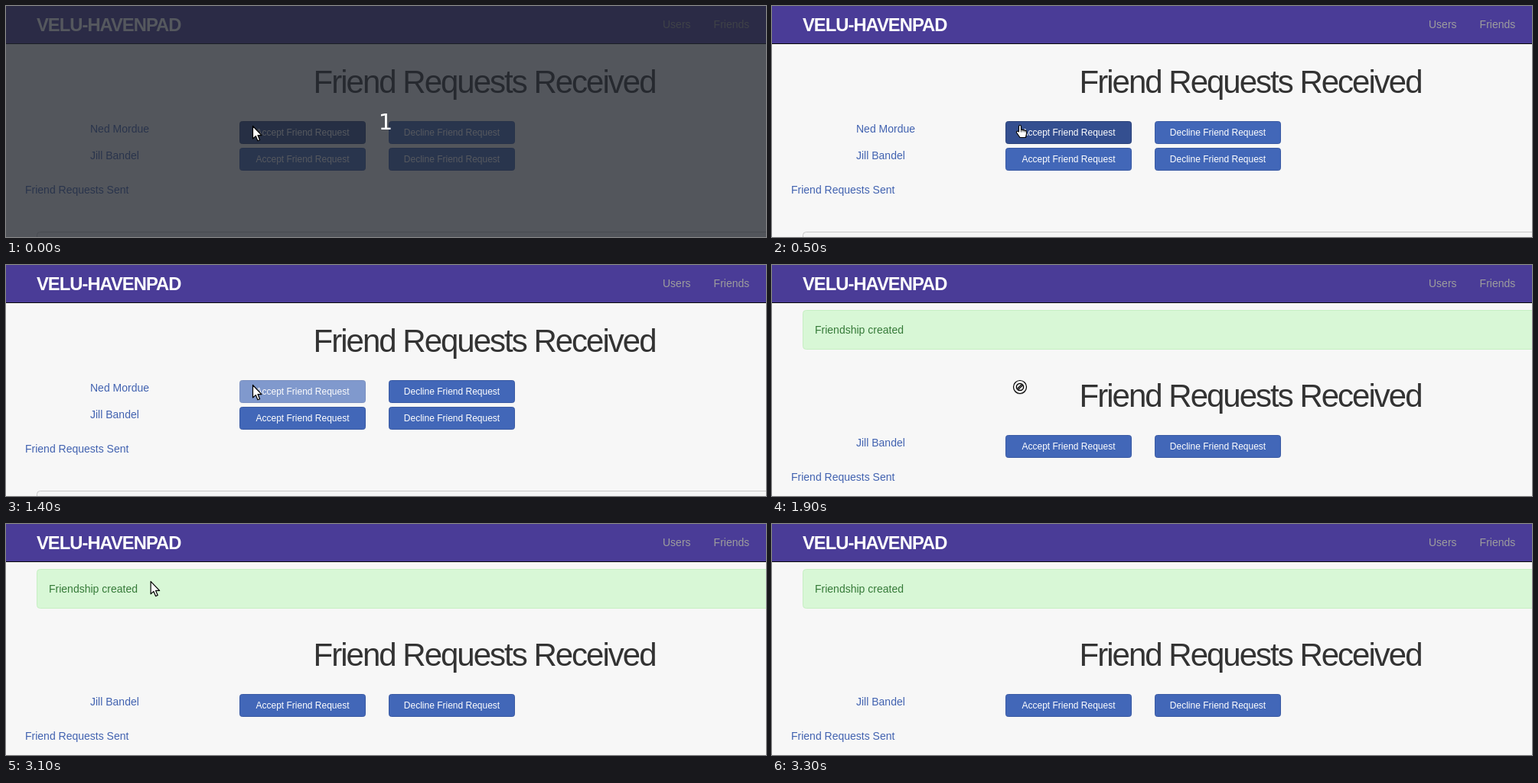
These frames come from a looping animation (993x303 px, 3800 ms). An HTML page:

```html
<!DOCTYPE html>
<html lang="en">
<head>
<meta charset="utf-8">
<title>Friend requests</title>
<style>
  html, body { margin: 0; width: 100%; height: 100%; overflow: hidden; background: #f7f7f7; }
  svg { display: block; font: 14px "Liberation Sans", Arial, sans-serif; }
  .link { fill: #4162b0; }
  .nav { fill: #9d9d9d; }
  .logo { font-size: 23.8px; font-weight: bold; letter-spacing: -1px; fill: #fff; }
  .title { font-size: 42px; letter-spacing: -2px; fill: #333; }
  .button rect { fill: #4267b8; stroke: #3a5aa3; }
  .button text { font-size: 12px; text-anchor: middle; fill: #fff; }
  .hover rect { fill: #344f90; stroke: #2b4279; }
  .pressed rect { fill: #293c70; stroke: #22325f; }
  .disabled { opacity: .65; }
  .count { font: 29px "DejaVu Sans", sans-serif; text-anchor: middle; fill: #fff; }
  .cursor { fill: #fff; stroke: #000; stroke-width: 1.2; stroke-linejoin: round; }
</style>
</head>
<body>
<svg width="993" height="303" viewBox="0 0 993 303">
  <defs>
    <g id="accept" class="button">
      <rect x="305.5" y=".5" width="164" height="29" rx="3"/>
      <text x="387.5" y="19">Accept Friend Request</text>
    </g>
    <g id="decline" class="button">
      <rect x="500.5" y=".5" width="164" height="29" rx="3"/>
      <text x="582.5" y="19">Decline Friend Request</text>
    </g>
  </defs>

  <rect width="993" height="303" fill="#f7f7f7"/>
  <rect width="993" height="49" fill="#4a3c97"/>
  <rect y="49" width="993" height="1" fill="#080808"/>
  <text class="logo" x="40" y="33">VELU-HAVENPAD</text>
  <text class="nav" x="858" y="29">Users</text>
  <text class="nav" x="924.6" y="29">Friends</text>

  <g id="alert">
    <rect x="40.5" y="59.5" width="1169" height="51" rx="4" fill="#d8f7d6" stroke="#c6efc3"/>
    <text x="56" y="90" fill="#357a38">Friendship created</text>
  </g>

  <text id="title" class="title" x="401.6" y="114">Friend Requests Received</text>

  <g id="firstRow">
    <text class="link" x="110" y="166">Ned Mordue</text>
    <rect id="ring" x="304.5" y="150.5" width="166" height="31" rx="3.5" fill="none" stroke="#5a78dc"/>
    <g id="target" transform="translate(0 151)">
      <g class="button">
        <rect x="305.5" y=".5" width="164" height="29" rx="3"/>
        <text x="387.5" y="19">Accept Friend Request</text>
      </g>
    </g>
    <use href="#decline" y="151"/>
  </g>

  <g id="rest">
    <text class="link" x="110" y="201">Jill Bandel</text>
    <use href="#accept" y="186"/>
    <use href="#decline" y="186"/>
    <text class="link" x="25" y="246">Friend Requests Sent</text>
    <rect x="40.5" y="296.5" width="1169" height="80" rx="4" fill="#f5f5f5" stroke="#c8c8c8"/>
  </g>

  <g id="countdown">
    <rect width="993" height="303" fill="#22262e" fill-opacity=".77"/>
    <text class="count" x="496" y="162">1</text>
  </g>

  <path id="arrow" class="cursor" d="M.5 .5V17l3.8-3.4 2.6 6.2 2.7-1.1-2.6-6.1h5z"/>
  <g id="hand" class="cursor">
    <path d="M322.5 165V158a1.5 1.5 0 0 1 3 0v4.5q1.5-1 2.5.3 1.6-.7 2.5.5 2-.3 2 1.5v3.2l-1 4.5h-7.5l-4.5-6.5q-.3-2 1.5-1.7z"/>
    <path d="M325.5 162.5v3M328 163v2.5M330.5 163.5v2" stroke-width=".8"/>
  </g>
  <g id="blocked" class="cursor">
    <circle cx="324" cy="161" r="9" fill="#000" stroke="none" opacity=".25"/>
    <circle cx="324" cy="160" r="8.5"/>
    <circle cx="324" cy="160" r="4.6" stroke-width="1.5"/>
    <path d="M320.6 162.2l5.6-5.6M321.8 163.4l5.6-5.6" stroke-width="1.3"/>
  </g>
</svg>
<script>
  const LOOP = 3800;
  const byId = id => document.getElementById(id);
  const show = (id, on) => { byId(id).style.display = on ? "" : "none"; };
  const move = (id, x, y) => byId(id).setAttribute("transform", `translate(${x} ${y})`);

  function buttonState(t) {
    if (t < 1200) return "hover";
    return t < 1400 ? "pressed" : "disabled";
  }

  function draw(t) {
    const accepted = t >= 1900;
    const hand = t >= 500 && t < 1400;
    const blocked = accepted && t < 2900;

    show("countdown", t < 500);
    show("alert", accepted);
    show("firstRow", !accepted);
    move("title", 0, accepted ? 72 : 0);
    move("rest", 0, accepted ? 37 : 0);

    byId("target").setAttribute("class", buttonState(t));
    show("ring", buttonState(t) === "pressed");

    // The pointer leaves to the upper left in 100 ms steps, speeding up.
    const step = Math.max(0, Math.floor((t - 2900) / 100));
    const eased = (step / 3) ** 1.5;
    move("arrow", 322 - 245 * eased, 157 - 151 * eased);
    show("arrow", !hand && !blocked && t < 3300);
    show("hand", hand);
    show("blocked", blocked);
  }

  const start = performance.now();
  function tick() {
    draw((performance.now() - start) % LOOP);
    requestAnimationFrame(tick);
  }
  tick();
</script>
</body>
</html>
```
